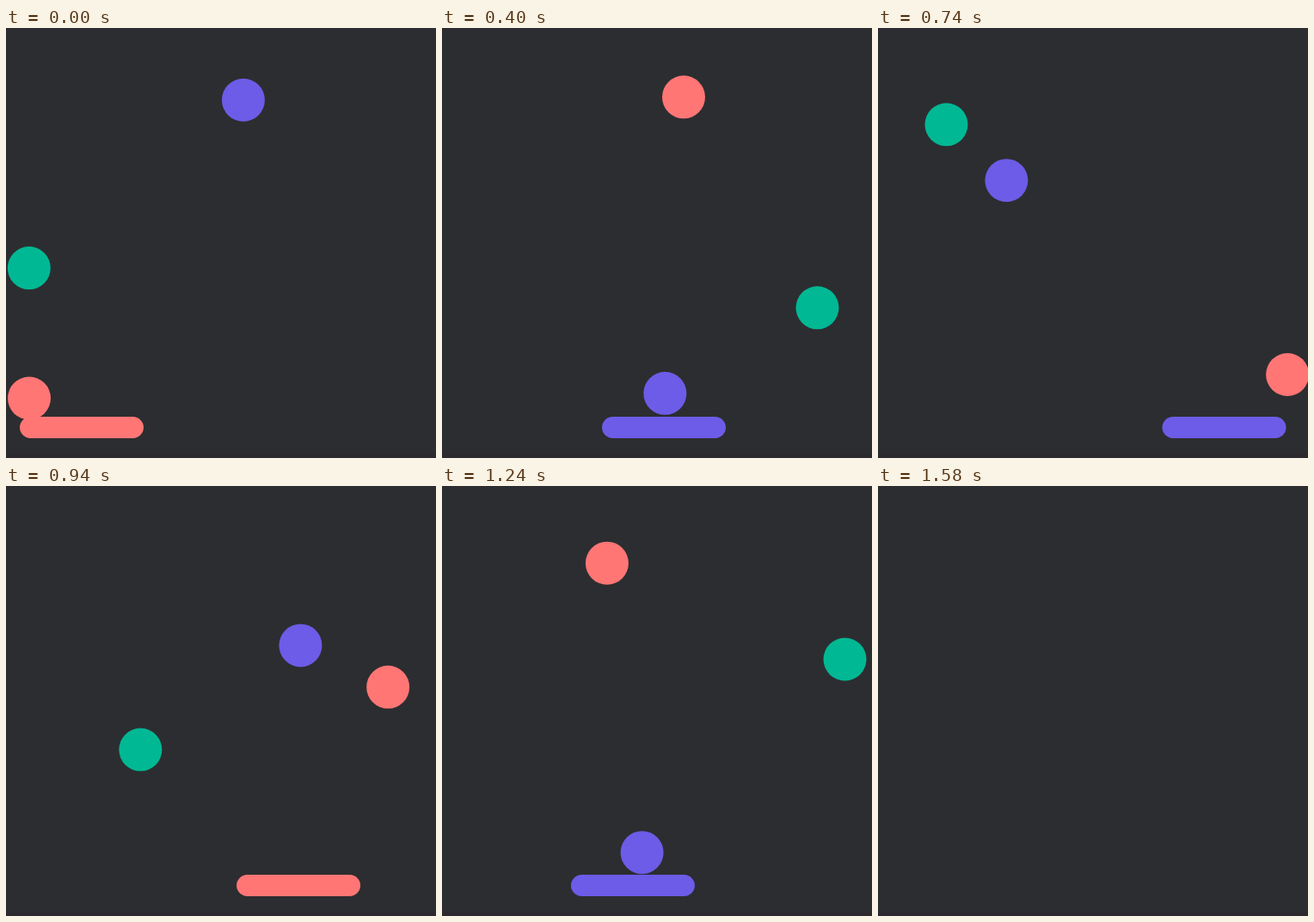
Write an HTML page that moves like this. It is 500 px wide and 500 px high and loops after 1600 ms.

```html
<!DOCTYPE html>
<html lang="en">
<head>
<meta charset="utf-8">
<title>Bouncing balls</title>
<style>
  html, body { margin: 0; height: 100%; overflow: hidden; background: #2c2d30; }
  svg { display: block; width: 500px; height: 500px; }
</style>
</head>
<body>
<svg id="stage" viewBox="0 0 500 500">
  <rect y="495" width="500" height="5" fill="#2c2a2e"/>
  <g id="scene">
    <rect id="bar" y="452" width="144" height="25" rx="12.5"/>
  </g>
</svg>
<script>
const LOOP = 1600, CYCLE = 1580, STEP = 20, TURN = 760;
const scene = document.getElementById('scene'), bar = document.getElementById('bar');

function svg(tag, attrs) {
  const el = document.createElementNS('http://www.w3.org/2000/svg', tag);
  for (const name in attrs) el.setAttribute(name, attrs[name]);
  return el;
}

// A leg is one curve, travelled at constant speed between two times.
function leg(start, end, d) {
  const path = svg('path', { d }), length = path.getTotalLength();
  const at = t => path.getPointAtLength(length * (t - start) / (end - start));
  return { start, end, at, bounce: at(start).y > 420 };
}

function ball(color, ...legs) {
  const dot = svg('circle', { r: 25, fill: color });
  scene.append(dot);
  return { color, legs, dot };
}

const balls = [
  ball('#ff7675',
    leg(0, 764, 'M27 430.5C47 -38 487 -38 476 432'),
    leg(764, 1580, 'M476 432C460 -58 98 -58 27 430.5')),
  ball('#00b894',
    leg(153, 540, 'M207 430C560 410 498 357 293 215'),
    leg(540, 1080, 'M293 215C24 28 -61 94 270 430'),
    leg(1080, 1240, 'M270 430C365 385 454 299 468.5 201.5'),
    leg(1240, 1733, 'M468.5 201.5C499 6 -327 214 207 430')),
  ball('#6c5ce7',
    leg(390, 1238, 'M268 430C-285 105 715 30 235 428'),
    leg(1238, 1970, 'M235 428C-333 0 965 -68 268 430'))
];

// The bar takes the colour of the ball that bounced last.
const bounces = balls
  .flatMap(b => b.legs.filter(l => l.bounce).map(l => ({ time: l.start, color: b.color })))
  .sort((a, b) => a.time - b.time);

function moveBar(t) {
  const reach = t < TURN ? t / TURN : (CYCLE - t) / (CYCLE - TURN);
  bar.setAttribute('x', 16 + 323 * reach);
  bar.setAttribute('fill', bounces.filter(b => b.time <= t).pop().color);
}

function moveBall({ legs, dot }, t) {
  const time = t < legs[0].start ? t + CYCLE : t;
  const { x, y } = legs.find(l => time < l.end).at(time);
  dot.setAttribute('cx', x);
  dot.setAttribute('cy', y);
}

function draw() {
  const t = Math.floor(performance.now() % LOOP / STEP) * STEP;
  const shown = t < CYCLE;
  scene.style.display = shown ? '' : 'none';
  if (shown) {
    moveBar(t);
    balls.forEach(b => moveBall(b, t));
  }
  requestAnimationFrame(draw);
}
draw();
</script>
</body>
</html>
```
